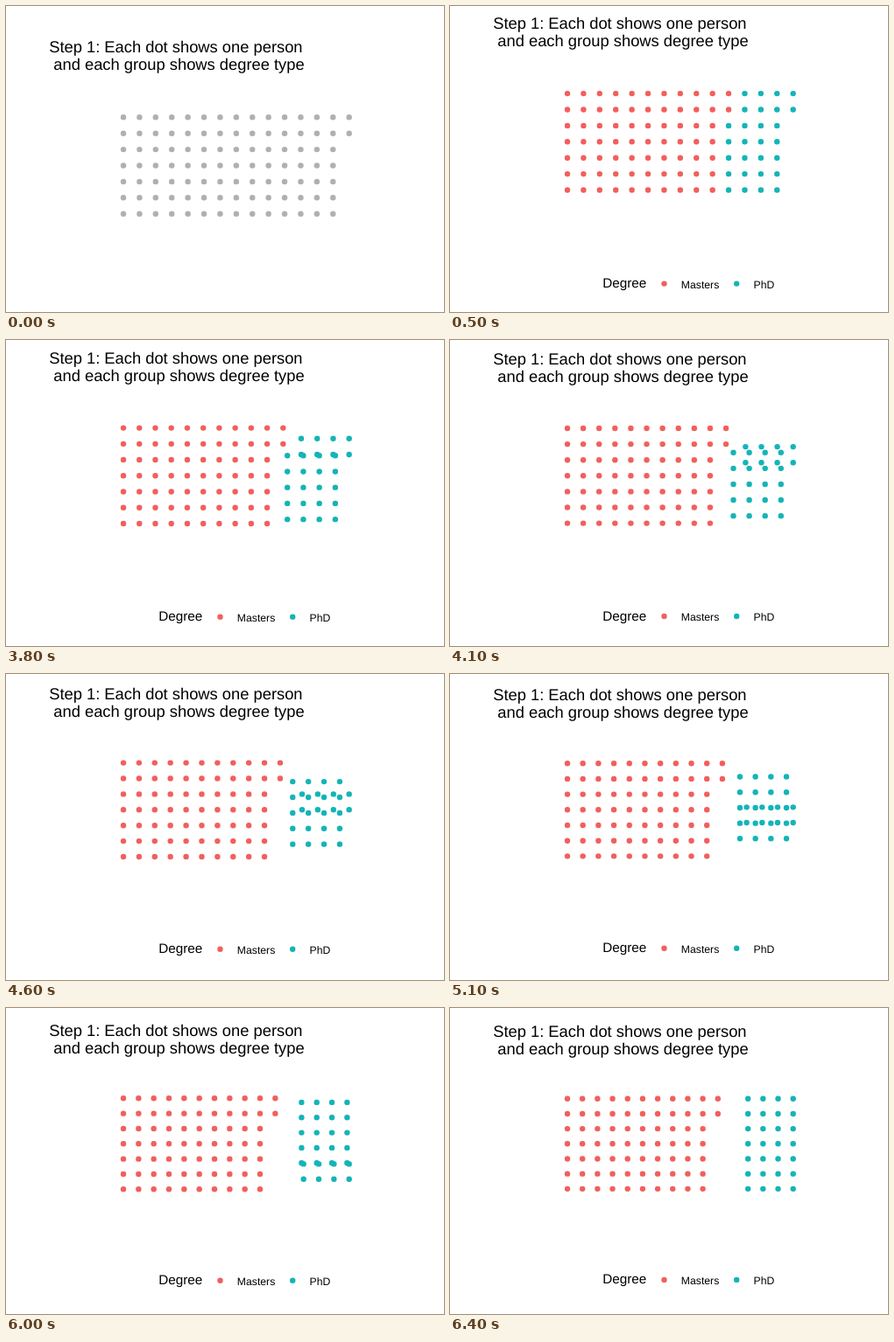
An HTML page for the animation above (8 s loop, 500 by 350 pixels).

```html
<!DOCTYPE html>
<html lang="en">
<head>
<meta charset="utf-8">
<title>Degree types</title>
<style>
  html, body { margin: 0; width: 100%; height: 100%; overflow: hidden; background: #fff; }
  svg { display: block; font-family: "Liberation Sans", Arial, sans-serif; text-rendering: geometricPrecision; }
  #title { font-size: 18.33px; }
  #legend { font-size: 12.22px; }
  #legend .head { font-size: 15.28px; }
  .masters { fill: #f25f5c; }
  .phd { fill: #14b4b8; }
  .plain circle { fill: #b0b0b0; }
  .plain #legend { display: none; }
</style>
</head>
<body>
<svg id="stage" width="500" height="350" viewBox="0 0 500 350">
  <g id="title">
    <text x="49.2" y="26">Step 1: Each dot shows one person</text>
    <text x="54.3" y="46">and each group shows degree type</text>
  </g>
  <g id="dots"></g>
  <g id="legend">
    <text class="head" x="174.2" y="322.2">Degree</text>
    <circle class="masters" cx="244.5" cy="317.6" r="3.2"/>
    <text x="263.8" y="322.8">Masters</text>
    <circle class="phd" cx="327.2" cy="317.6" r="3.2"/>
    <text x="346.5" y="322.8">PhD</text>
  </g>
</svg>
<script>
const $ = id => document.getElementById(id);
const LOOP = 8000, COLOUR_AT = 500, MOVE_AT = 3400, STEP = 100, STEPS = 30;
const LEFT = 134, WIDTH = 257.7, MIDDLE = 155.3, ROWS = 7;
const dots = [];

// dx, dy: how far a dot travels, in grid cells
function addDot(type, col, row, dx, dy) {
  const el = document.createElementNS("http://www.w3.org/2000/svg", "circle");
  el.setAttribute("class", type);
  el.setAttribute("r", 3.2);
  $("dots").append(el);
  dots.push({ el, col, row, dx, dy });
}

for (let row = 0; row < ROWS; row++) {
  const long = row < 2;
  const split = long ? 11 : 10;
  for (let col = 0; col < split; col++) addDot("masters", col, row, 0, 0);
  for (let col = split; col < split + 4; col++)
    addDot("phd", col, row, long ? 1 : 2, long ? 5 : -2);
}

const shift = (id, y) => $(id).setAttribute("transform", `translate(0 ${y})`);

function draw(time) {
  const t = time % LOOP;
  const plain = t < COLOUR_AT;
  const step = Math.floor((t - MOVE_AT) / STEP);
  const p = Math.min(Math.max(step, 0), STEPS) / STEPS;
  // The grid grows from 14 to 15 cells wide inside a fixed width
  const cell = WIDTH / (14 + p);
  const shrink = (WIDTH / 14 - cell) * 5.45;
  const drop = plain ? 27.2 : 0;

  $("stage").setAttribute("class", plain ? "plain" : "");
  shift("title", shrink + drop);
  shift("dots", drop);
  shift("legend", -shrink);
  for (const { el, col, row, dx, dy } of dots) {
    el.setAttribute("cx", LEFT + (col + dx * p) * cell);
    el.setAttribute("cy", MIDDLE + (row + dy * p - 3) * cell);
  }
}

const start = performance.now();
function tick() {
  draw(performance.now() - start);
  requestAnimationFrame(tick);
}
tick();
</script>
</body>
</html>
```
